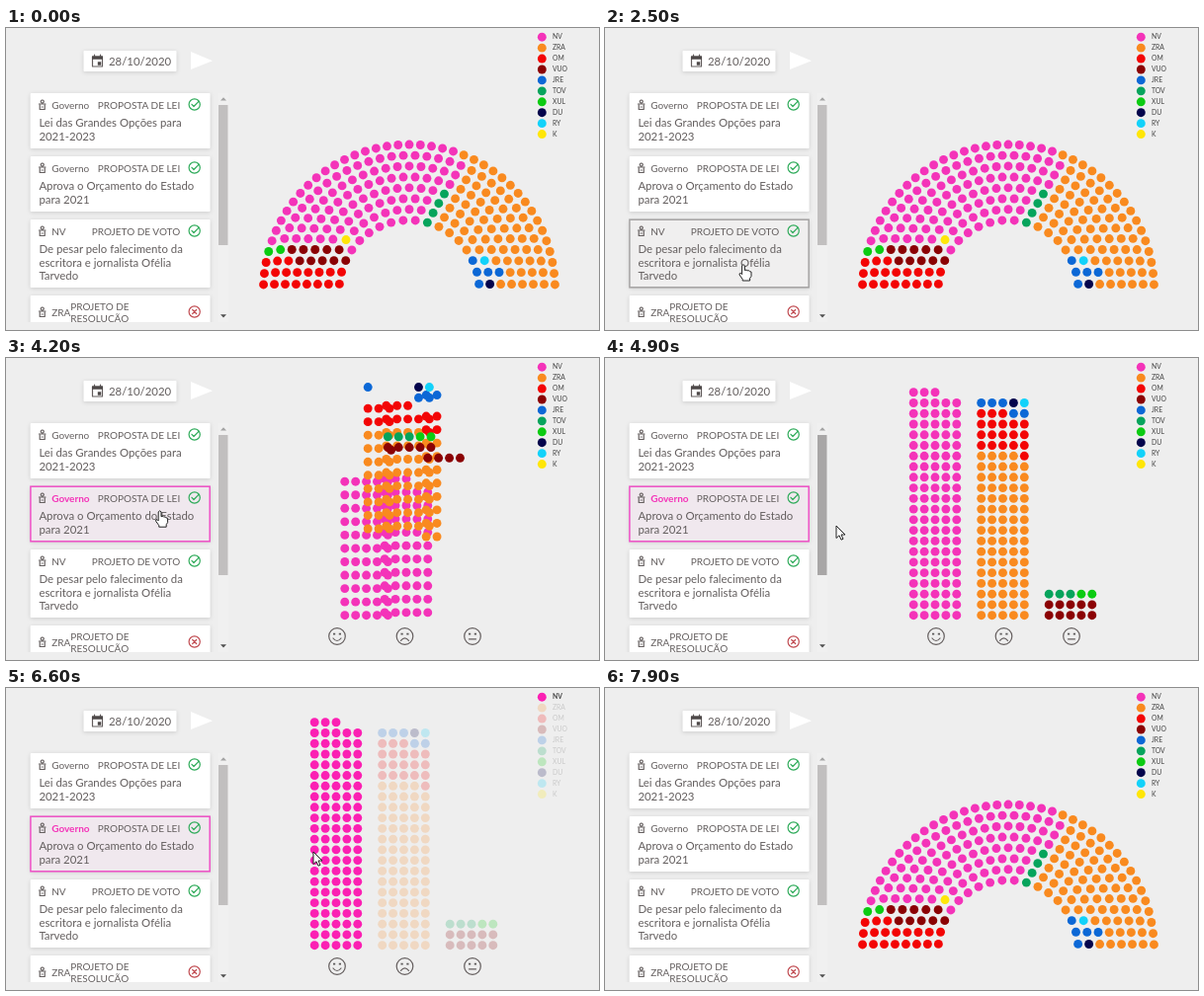
An HTML page that plays this animation: 600 px wide and 306 px high, repeating every 8000 ms.

```html
<!DOCTYPE html>
<html lang="pt">
<head>
<meta charset="utf-8">
<title>Votações</title>
<style>
  html, body { margin: 0; width: 100%; height: 100%; overflow: hidden; background: #eee; }
  svg { display: block; width: 600px; height: 306px; }
  text { font-family: Lato, "Open Sans", sans-serif; fill: #635e5e; }
  .title { font-size: 11.4px; }
  .head { font-size: 10px; }
  .legend text { font-size: 6.8px; fill: #444; }
  .box { filter: drop-shadow(0 1px 2px rgba(0, 0, 0, .14)); }
  .icon { fill: none; stroke: #645e5e; stroke-width: 1.2; stroke-linecap: round; stroke-linejoin: round; }
</style>
</head>
<body>
<svg id="stage" viewBox="0 0 600 306"></svg>
<script>
const LOOP = 8000, MOVE = 600, DOT = 4.45, PINK = '#f433b9';
const stage = document.getElementById('stage');

// Listed in the order in which the bars stack them.
const parties = [
  ['NV', PINK], ['ZRA', '#f98a1f'], ['OM', '#f30505'], ['VUO', '#8b0204'], ['JRE', '#0c68d6'],
  ['TOV', '#06a45c'], ['XUL', '#0bcb12'], ['DU', '#04044c'], ['RY', '#12d2fa'], ['K', '#ffe608']
].map(([name, color]) => ({ name, color }));
const [NV, ZRA, OM, VUO, JRE, TOV, XUL, DU, RY, K] = parties.keys();

function add(parent, tag, attrs = {}, content) {
  const el = document.createElementNS('http://www.w3.org/2000/svg', tag);
  set(el, attrs);
  if (content) el.textContent = content;
  return parent.appendChild(el);
}
function set(el, attrs) {
  for (const key in attrs) el.setAttribute(key, attrs[key]);
}
const show = (el, on) => el.setAttribute('visibility', on ? 'visible' : 'hidden');
const icon = (parent, d, attrs = {}) => add(parent, 'path', { class: 'icon', d, ...attrs });

// Date picker
add(stage, 'rect', { class: 'box', x: 78.5, y: 23, width: 94, height: 21, rx: 1, fill: '#fff' });
icon(stage, 'M87.5 29h10v10h-10zM89.5 27v2M95.5 27v2');
add(stage, 'path', { d: 'M87 28.5h11v3.2h-11zM92.8 34.3h3.4v3.4h-3.4z', fill: '#4d4848' });
add(stage, 'text', { class: 'title', x: 104, y: 38 }, '28/10/2020');
add(stage, 'path', { d: 'M187 24L209 33.3L187 42Z', fill: '#fff' });

// Proposal list
const clip = add(add(stage, 'defs'), 'clipPath', { id: 'list' });
add(clip, 'rect', { x: 15, y: 60, width: 200, height: 238 });
const list = add(stage, 'g', { 'clip-path': 'url(#list)' });

function card(y, height, author, kind, lines, passed = true) {
  const g = add(list, 'g', { transform: `translate(24.7 ${y})` });
  add(g, 'rect', { class: 'box', width: 181.8, height, rx: 1, fill: '#fff' });
  const frame = add(g, 'rect', { x: .2, y: .2, width: 181.3, height: height - .4, fill: '#fff', 'stroke-width': 1.5 });
  const mid = kind.length > 1 ? 17 : 12;
  icon(g, `M12 ${mid - 5}a1.5 1.5 0 1 0 .1 0zM8.7 ${mid - 1}h6.6M9.5 ${mid}v4.5h5v-4.5M11.5 ${mid + 2}h1`, { 'stroke-width': 1 });
  const who = add(g, 'text', { class: 'head', x: 21.5, y: mid + 3.8 }, author);
  kind.forEach((text, i) => add(g, 'text', kind.length > 1
    ? { class: 'head', x: 40.5, y: 14.5 + i * 12.5 }
    : { class: 'head', x: 151.5, y: 15.8, 'text-anchor': 'end' }, text));
  const color = passed ? '#2fab5a' : '#c04a50';
  add(g, 'circle', { class: 'icon', cx: 166, cy: mid - .5, r: 5.6, style: `stroke:${color}` });
  icon(g, passed ? `M163.3 ${mid - .7}l2 2.2l5-5.2` : `M164 ${mid - 2.5}l4 4m0-4l-4 4`, { style: `stroke:${color}` });
  lines.forEach((text, i) => add(g, 'text', { class: 'title', x: 8.7, y: 33.8 + i * 13.7 }, text));
  return { y, height, frame, who };
}
const cards = [
  card(66, 56, 'Governo', ['PROPOSTA DE LEI'], ['Lei das Grandes Opções para', '2021-2023']),
  card(130, 56, 'Governo', ['PROPOSTA DE LEI'], ['Aprova o Orçamento do Estado', 'para 2021']),
  card(194, 69, 'NV', ['PROJETO DE VOTO'],
    ['De pesar pelo falecimento da', 'escritora e jornalista Ofélia', 'Tarvedo']),
  card(271, 60, 'ZRA', ['PROJETO DE', 'RESOLUÇÃO'], [], false)
];

// Scrollbar
add(stage, 'rect', { x: 214.5, y: 66, width: 11, height: 232, fill: '#f0f0f0' });
add(stage, 'path', { d: 'M217 73.5l3-3.2l3 3.2z', fill: '#a3a3a3' });
add(stage, 'path', { d: 'M217 290.3l3 3.2l3-3.2z', fill: '#505050' });
const thumb = add(stage, 'rect', { x: 215, y: 78, width: 9.5, height: 142 });

// Legend
const legend = add(stage, 'g', { class: 'legend' });
parties.forEach((party, i) => {
  const y = 9.2 + i * 10.93;
  party.key = add(legend, 'g');
  party.dot = add(party.key, 'circle', { cx: 542.3, cy: y, r: DOT, fill: party.color });
  party.label = add(party.key, 'text', { x: 553, y: y + 2.2 }, party.name);
});

// Seats: eight rings, party chosen by ring and by place from either end
const ringSizes = [18, 21, 24, 27, 30, 33, 36, 41];
const ringSplits = [11, 13, 15, 17, 19, 21, 23, 25];

function partyAt(ring, fromLeft, fromRight, split) {
  if (fromLeft < 2) return OM;
  if (fromLeft === 2) return ring > 4 ? OM : VUO;
  if (fromLeft === 3 && ring > 0) return ring > 5 ? XUL : VUO;
  if (fromLeft === 4 && ring === 1) return K;
  if (ring < 4 && fromLeft === split - 1) return TOV;
  if (ring === 0 && fromRight < 3) return JRE;
  if (ring === 1 && fromRight < 3) return [DU, JRE, RY][fromRight];
  if (ring === 2 && fromRight === 1) return JRE;
  return fromLeft < split ? NV : ZRA;
}

const seats = [];
ringSizes.forEach((size, ring) => {
  const radius = 70.9 + ring * 10.95;
  for (let j = 0; j < size; j++) {
    const turn = (j + .5) / size, angle = turn * Math.PI;
    seats.push({
      turn, party: partyAt(ring, j, size - 1 - j, ringSplits[ring]),
      spots: [[408 - radius * Math.cos(angle), 265.6 - radius * Math.sin(angle)]]
    });
  }
});
seats.sort((a, b) => a.party - b.party || a.turn - b.turn);

// One seat of TOV and the only one of K take no part in the votes.
const lastTov = seats.filter(s => s.party === TOV).pop();
const isAbsent = seat => seat.party === K || seat === lastTov;
const voters = seats.filter(s => !isAbsent(s));

function stack(members, layout, left, columns) {
  members.forEach((seat, i) => {
    seat.spots[layout] = [left + i % columns * 10.9, 260.7 - Math.floor(i / columns) * 10.76];
  });
}
stack(voters, 1, 353.5, 10);
[[NV], [ZRA, OM, JRE, DU, RY], [VUO, TOV, XUL]].forEach((side, i) =>
  stack(voters.filter(s => side.includes(s.party)), 2, 312.2 + i * 68.5, 5));

const chart = add(stage, 'g');
[...seats.filter(isAbsent), ...voters].forEach(seat => {
  seat.el = add(chart, 'circle', { r: DOT, fill: parties[seat.party].color });
});

// Faces under the bars
const faces = [[335, 'M-4 2q4 5 8 0'], [403.5, 'M-4 4.3q4-5 8 0'], [472, 'M-3.5 2.8h7']].map(([x, mouth]) => {
  const g = add(stage, 'g');
  add(g, 'circle', { class: 'icon', r: 8.3 });
  const lips = icon(g, mouth);
  add(g, 'path', { d: 'M-4-2.4h2.2M1.8-2.4h2.2', stroke: '#5c5a5a', 'stroke-width': 1.8 });
  return { g, x, lips, mouth };
});

// Pointers
const arrow = add(stage, 'path', {
  d: 'M0 0V12.5L3 9.8L5 14.2L7 13.3L5 9H9Z', fill: '#fff', stroke: '#222', 'stroke-width': 1
});
const hand = add(stage, 'path', {
  d: 'M-1.4 1.2Q0-.8 1.4 1.2V6L3.2 5.6L4 6.4L5.6 6.2L6.4 7.2L8 7.6V12L6.6 14V16.5H-.8V15L-4 10.5Q-4.2 8.6-2.6 9L-1.4 10.2Z',
  fill: '#fff', stroke: '#222', 'stroke-width': 1, 'stroke-linejoin': 'round'
});

// Timeline: layouts 0 = hemicycle, 1 = single bar, 2 = three bars
const moves = [[2560, 1], [3960, 2], [7240, 0]];
const selections = [[2600, 3900, 2], [4000, 7260, 1]];
const presses = [[2450, 2600, 2], [3900, 4000, 1], [7260, 7750, 1]];
const pointerPath = [
  [1950, 134, 306], [2400, 140, 239.5], [3500, 140, 239.5], [3820, 152, 154], [4100, 152, 154],
  [4900, 234, 170], [5150, 234, 170], [5800, 308, 168], [6600, 311, 166], [6780, 310, 166],
  [7180, 157, 153], [7750, 157, 153]
];

const easeInOut = u => u < .5 ? 4 * u ** 3 : 1 - 4 * (1 - u) ** 3;
const clamp = u => Math.min(1, Math.max(0, u));
const active = (ranges, t) => (ranges.find(([from, to]) => t >= from && t < to) || [])[2];

function pointerAt(t) {
  const next = pointerPath.findIndex(p => p[0] > t);
  if (next < 1) return null;
  const [t0, x0, y0] = pointerPath[next - 1], [t1, x1, y1] = pointerPath[next];
  const u = clamp((t - t0) / (t1 - t0)), s = u * u * (3 - 2 * u);
  return [x0 + (x1 - x0) * s, y0 + (y1 - y0) * s];
}

function drawChart(t) {
  let from = 0, to = 0, start = -MOVE;
  for (const [at, layout] of moves) if (t >= at) [from, to, start] = [to, layout, at];
  const k = easeInOut(clamp((t - start) / MOVE));
  const focus = clamp((t - 5800) / 150) * clamp((6950 - t) / 150);

  for (const seat of seats) {
    const a = seat.spots[from] || seat.spots[0], b = seat.spots[to] || seat.spots[0];
    set(seat.el, {
      cx: a[0] + (b[0] - a[0]) * k, cy: a[1] + (b[1] - a[1]) * k,
      opacity: seat.party === NV ? 1 : 1 - .79 * focus,
      fill: seat.party === NV && focus > .5 ? '#fb20b3' : parties[seat.party].color
    });
    show(seat.el, to === 0 || !isAbsent(seat));
  }
  parties.forEach((party, i) => party.key.setAttribute('opacity', i === NV ? 1 : 1 - .79 * focus));
  set(parties[NV].dot, { fill: focus > .5 ? '#fb20b3' : PINK });
  set(parties[NV].label, { 'font-weight': focus > .5 ? 700 : 400 });

  faces.forEach((face, i) => {
    show(face.g, to === 2 || to === 1 && i === 1);
    set(face.g, { transform: `translate(${face.x} 282)`, opacity: from === 0 ? k : 1 });
  });
  // The single bar stands in the middle and holds the votes in favour.
  faces[1].lips.setAttribute('d', faces[to === 1 ? 0 : 1].mouth);
}

function drawCards(t) {
  const selected = active(selections, t), pressed = active(presses, t);
  cards.forEach((c, i) => {
    const on = i === selected, down = i === pressed;
    set(c.frame, {
      fill: on ? (t < 4000 ? '#f1e3ec' : '#f0e8ee') : down ? '#f0efef' : '#fff',
      stroke: on ? '#ee50c6' : down ? '#a5a3a3' : 'none'
    });
    set(c.who, { style: on ? `fill:${PINK};font-weight:700` : '' });
  });
}

function drawPointer(t) {
  const at = pointerAt(t);
  const over = at && at[0] > 25 && at[0] < 207 && cards.some(c => at[1] >= c.y && at[1] <= c.y + c.height);
  show(hand, over);
  show(arrow, at && !over);
  if (at) set(over ? hand : arrow, { transform: `translate(${at[0]} ${at[1]})` });
  set(thumb, { fill: t > 4650 && t < 5000 ? '#a8a6a6' : '#c1bfbf' });
}

function draw(now) {
  const t = now % LOOP;
  drawChart(t);
  drawCards(t);
  drawPointer(t);
}

const begin = performance.now();
function tick() {
  draw(performance.now() - begin);
  requestAnimationFrame(tick);
}
tick();
</script>
</body>
</html>
```
